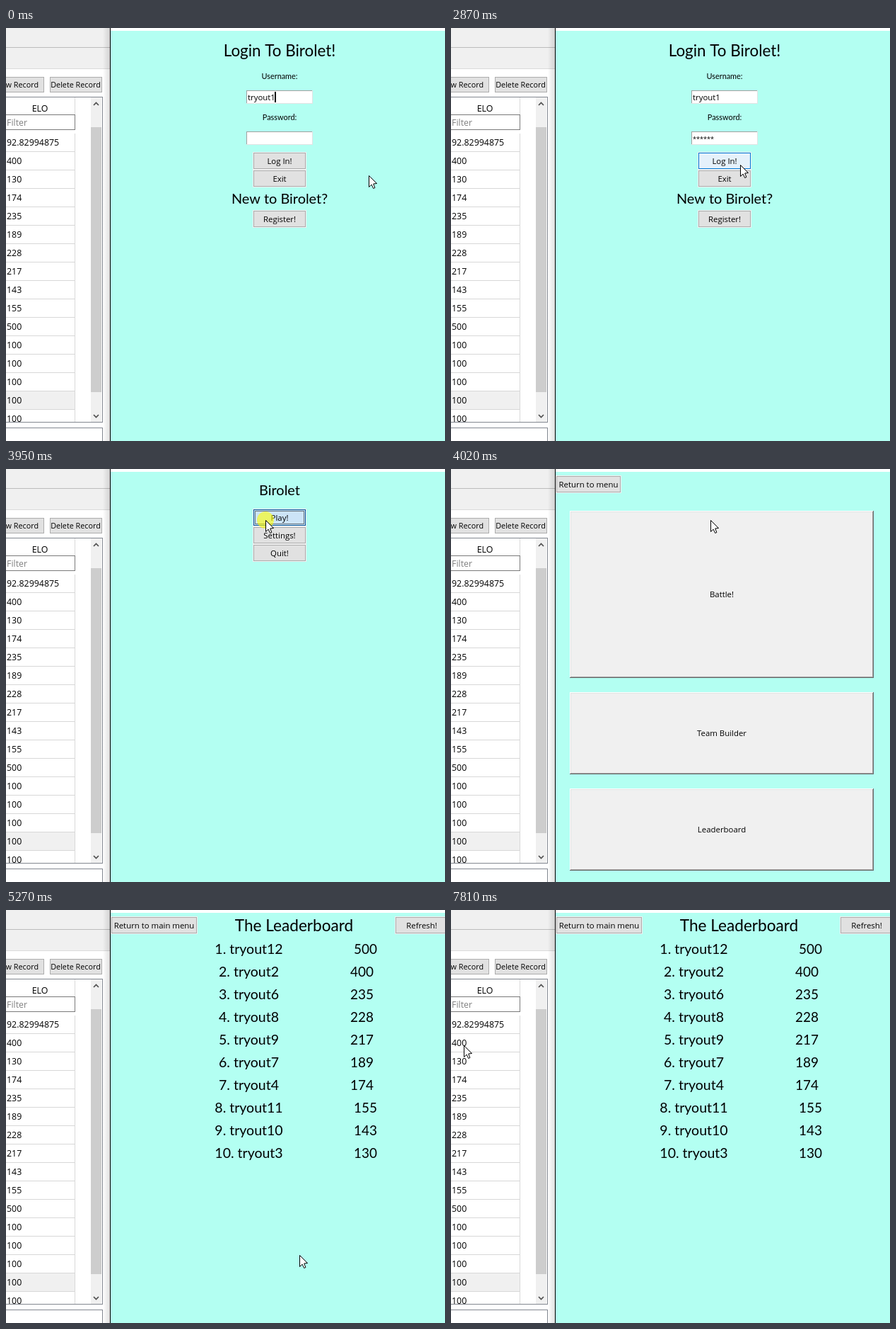
An HTML page with a canvas that plays this animation: 621x583 px, repeating every 8000 ms.

```html
<!DOCTYPE html>
<html lang="en">
<head>
<meta charset="utf-8">
<title>Login and leaderboard</title>
<style>
html, body { margin: 0; width: 100%; height: 100%; overflow: hidden; background: #b3fff2; }
canvas { display: block; }
</style>
</head>
<body>
<canvas id="stage" width="621" height="583"></canvas>
<script>
const ctx = document.getElementById('stage').getContext('2d');
const LOOP = 8000;
const APP = 'Birolet';
const USER = 'tryout';
const UI = '"Open Sans", "Noto Sans", sans-serif';
const HEAD = 'Lato, "Open Sans", sans-serif';
const MID = 387;

const MENU_AT = 3020, GAME_AT = 4020, BOARD_AT = 5270;
const CLICK_LEAD = 80;
const KEY_TIMES = [1090, 1160, 1310, 1480, 2090, 2180];

const RATINGS = [92.82994875, 400, 130, 174, 235, 189, 228, 217, 143, 155, 500, ...Array(5).fill(100)];
// User number 5 does not exist, so later numbers are one higher.
const LEADERS = RATINGS
  .map((score, i) => ({ score, id: i < 4 ? i + 1 : i + 2 }))
  .sort((a, b) => b.score - a.score)
  .slice(0, 10);

const HOME = { x: 513, y: 208 };
const MOVES = [
  { from: 2640, to: 2870, x: 409, y: 193 },
  { from: 3330, to: 3640, x: 367, y: 72 },
  { from: 4330, to: 4560, x: 414, y: 357 },
  { from: 4870, to: 5100, x: 415, y: 487 },
  { from: 5490, to: 5950, x: 532, y: 40 },
  { from: 6410, to: 6720, x: 133, y: 215 },
  { from: 6796, to: 6950, x: 122, y: 203 },
  { from: 7190, to: 7420, x: 21, y: 183 },
  { from: 7740, to: 7810, x: 18, y: 191 }
];

const within = (v, a, b) => v >= a && v < b;
const clamp = v => Math.min(1, Math.max(0, v));
const ease = p => p * p * (3 - 2 * p);

function pointerAt(t) {
  let { x, y } = HOME;
  for (const move of MOVES) {
    if (t < move.from) break;
    const length = move.to - move.from;
    const steps = Math.round(length / 76);
    const step = Math.min(steps, Math.floor((t - move.from) / length * steps));
    const p = ease((step + 1) / (steps + 1));
    x += (move.x - x) * p;
    y += (move.y - y) * p;
  }
  return { x: Math.round(x), y: Math.round(y) };
}

function rect(x, y, w, h, color) {
  ctx.fillStyle = color;
  ctx.fillRect(x, y, w, h);
}

function frame(x, y, w, h, border, fill) {
  rect(x, y, w, h, border);
  rect(x + 1, y + 1, w - 2, h - 2, fill);
}

function text(str, x, y, size, family = UI, align = 'center', color = '#000') {
  ctx.font = `${size}px ${family}`;
  ctx.textAlign = align;
  ctx.fillStyle = color;
  ctx.fillText(str, x, y);
}

const BUTTON = {
  idle: ['#adadad', '#e1e1e1'],
  hover: ['#0078d7', '#e5f1fb'],
  pressed: ['#005499', '#cce4f7']
};

function button(label, x, y, w = 74, state = 'idle') {
  rect(x - 1, y - 1, w + 2, 25, '#f0f0f0');
  frame(x, y, w, 23, ...BUTTON[state]);
  if (state === 'pressed') {
    ctx.strokeStyle = '#000';
    ctx.lineWidth = 1;
    ctx.setLineDash([1, 1]);
    ctx.strokeRect(x + 2.5, y + 2.5, w - 5, 18);
    ctx.setLineDash([]);
  }
  text(label, x + w / 2, y + 16, 11.4);
}

function bigButton(label, y, h, sunken) {
  const x = 168, w = 430;
  const [outerTop, innerTop, innerLow, outerLow] = sunken
    ? ['#a0a0a0', '#696969', '#e3e3e3', '#fff']
    : ['#fff', '#e3e3e3', '#a0a0a0', '#696969'];
  rect(x, y, w, h, outerLow);
  rect(x, y, w - 1, h - 1, outerTop);
  rect(x + 1, y + 1, w - 2, h - 2, innerLow);
  rect(x + 1, y + 1, w - 3, h - 3, innerTop);
  rect(x + 2, y + 2, w - 4, h - 4, '#f0f0f0');
  const shift = sunken ? 1 : 0;
  text(label, x + w / 2 + shift, y + h / 2 + 4 + shift, 11.4);
}

function entry(label, y, value, size) {
  text(label, MID, y - 16, 10.9, HEAD);
  rect(340, y, 94, 19, '#e3e3e3');
  rect(340, y, 93, 18, '#a0a0a0');
  rect(341, y + 1, 92, 17, '#fff');
  text(value, 342, y + 14, size, UI, 'left');
}

function chevron(y, dir) {
  ctx.beginPath();
  ctx.moveTo(124, y + 2 * dir);
  ctx.lineTo(127.5, y - 1.5 * dir);
  ctx.lineTo(131, y + 2 * dir);
  ctx.strokeStyle = '#505050';
  ctx.lineWidth = 1.7;
  ctx.stroke();
}

function drawTable(t) {
  rect(0, 0, 147, 583, '#fff');
  rect(0, 0, 147, 57, '#f0f0f0');
  rect(0, 27, 147, 1, '#bcbcbc');
  rect(0, 57, 147, 1, '#dadada');

  frame(-30, 69, 84, 22, '#adadad', '#e1e1e1');
  text('w Record', 46, 84, 10.8, UI, 'right');
  frame(62, 69, 74, 22, '#adadad', '#e1e1e1');
  text('Delete Record', 98.5, 84, 10.8);

  frame(-2, 97, 139, 460, '#828790', '#fff');
  text('ELO', 48, 118, 12.4);
  rect(97, 98, 1, 24, '#d8d8d8');
  frame(-2, 122, 100, 22, '#7a7a7a', '#fff');
  text('Filter', 1, 138, 12.4, UI, 'left', '#808080');

  ctx.save();
  ctx.beginPath();
  ctx.rect(0, 149, 120, 407);
  ctx.clip();
  RATINGS.forEach((value, i) => {
    const y = 149 + 26 * i;
    if (i === 14) rect(0, y, 97, 25, '#f0f0f0');
    rect(0, y + 25, 97, 1, '#d8d8d8');
    text(value, 1, y + 17, 12.4, UI, 'left');
  });
  rect(97, 149, 1, 407, '#d8d8d8');
  ctx.restore();

  const glow = clamp((t - 6680) / 250) - clamp((t - 7150) / 250);
  const grey = Math.round(205 - 39 * glow);
  rect(120, 98, 15, 458, '#f0f0f0');
  rect(120, 140, 15, 374, `rgb(${grey},${grey},${grey})`);
  chevron(107, 1);
  chevron(548, -1);

  frame(-2, 564, 139, 30, '#828790', '#fff');

  const shade = ctx.createLinearGradient(137, 0, 147, 0);
  shade.addColorStop(0, 'rgba(0,0,0,0)');
  shade.addColorStop(1, 'rgba(0,0,0,.13)');
  rect(137, 0, 10, 583, shade);
}

function drawLogin(x, y, t) {
  const typed = KEY_TIMES.filter(at => t >= at).length;
  text(`Login To ${APP}!`, MID, 40, 22.4, HEAD);
  entry('Username:', 88, USER + '1', 11.4);
  entry('Password:', 146, '*'.repeat(typed), 9.1);

  // The caret shows for 600 ms and hides for 300 ms.
  if ((t + 830) % 900 >= 300) {
    if (t < 370) rect(380, 90, 2, 15, '#000');
    else rect(341 + 5 * typed, 148, 2, 15, '#000');
  }

  button('Log In!', 350, 176, 74, isOver(x, y, 176) ? 'hover' : 'idle');
  button('Exit', 350, 201);
  text(`New to ${APP}?`, MID, 248, 19.9, HEAD);
  button('Register!', 350, 258);
}

const isOver = (x, y, top) => within(x, 350, 424) && within(y, top, top + 23);

function drawMenu(x, y, clicking) {
  text(APP, MID, 37, 19.9, HEAD);
  ['Play!', 'Settings!', 'Quit!'].forEach((label, i) => {
    const top = 57 + 25 * i;
    const active = clicking ? 'pressed' : 'hover';
    button(label, 350, top, 74, isOver(x, y, top) ? active : 'idle');
  });
}

function drawGame(clicking) {
  button('Return to menu', 149, 10, 91);
  bigButton('Battle!', 59, 236);
  bigButton('Team Builder', 315, 116);
  bigButton('Leaderboard', 451, 116, clicking);
}

function drawBoard() {
  button('Return to main menu', 149, 10, 121);
  button('Refresh!', 551, 10);
  text('The Leaderboard', 407.5, 30, 22.6, HEAD);
  LEADERS.forEach(({ score, id }, i) => {
    const y = 62 + 32 * i;
    const label = `${i + 1}. ${USER}${id}`;
    text(label, 343.5, y, 19.5, HEAD);
    text(score, label.length > 10 ? 508.5 : 503.5, y, 18.9, HEAD);
  });
}

function drawPointer(x, y, clicking) {
  if (clicking) {
    ctx.beginPath();
    ctx.arc(x, y, 12, 0, 2 * Math.PI);
    ctx.fillStyle = 'rgba(255,255,0,.6)';
    ctx.fill();
  }
  ctx.save();
  ctx.translate(x + 0.5, y + 0.5);
  ctx.beginPath();
  [[0, 0], [0, 16], [3.6, 12.6], [6.2, 18], [8.4, 17], [6.2, 11.5], [11, 11]]
    .forEach(p => ctx.lineTo(...p));
  ctx.closePath();
  ctx.fillStyle = '#fff';
  ctx.fill();
  ctx.strokeStyle = '#000';
  ctx.lineWidth = 1;
  ctx.stroke();
  ctx.restore();
}

function draw(t) {
  const { x, y } = pointerAt(t);
  const clicking = [GAME_AT, BOARD_AT].some(at => within(t, at - CLICK_LEAD - 10, at));

  drawTable(t);
  rect(147, 0, 1, 583, '#000');
  rect(148, 0, 473, 4, '#fff');
  rect(148, 4, 473, 579, '#b3fff2');

  if (t < MENU_AT) drawLogin(x, y, t);
  else if (t < GAME_AT) drawMenu(x, y, clicking);
  else if (t < BOARD_AT) drawGame(clicking);
  else drawBoard();

  drawPointer(x, y, clicking);
}

const start = performance.now();
function tick() {
  draw((performance.now() - start) % LOOP);
  requestAnimationFrame(tick);
}
tick();
</script>
</body>
</html>
```
